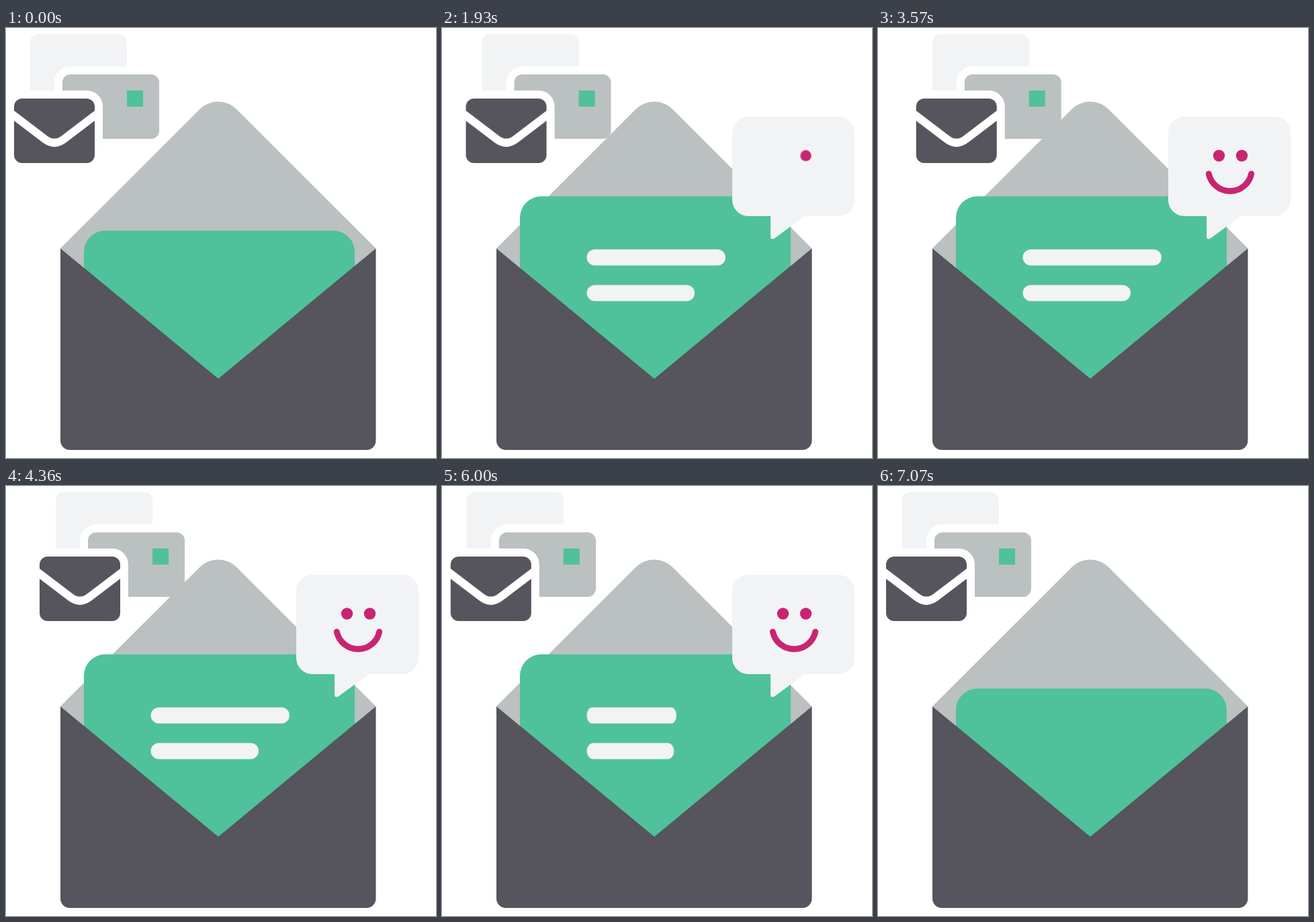
An HTML page without scripts that plays this animation: 640x640 px, repeating every 7.28 s.

```html
<!DOCTYPE html>
<html lang="en">
<head>
<meta charset="utf-8">
<title>Open envelope</title>
<style>
  html, body { margin: 0; width: 100%; height: 100%; overflow: hidden; background: #fff; }
  svg { display: block; width: 100vw; height: 100vh; }

  .dark { fill: #56545c; }
  .grey { fill: #bbc0c0; }
  .pale { fill: #f2f3f5; }
  .green { fill: #4fc19b; }
  .pink { fill: #c92471; }

  .move { animation: 7280ms cubic-bezier(.333, 0, .667, 1) infinite; }
  .mail { animation-name: drift; }
  .sheet { animation-name: rise; }
  .bubble { animation-name: pop; transform-origin: 489px 316px; }
  .line { transform-origin: 215.5px 0; }
  .first { animation-name: write-first; }
  .second { animation-name: write-second; }
  .eye-right { animation-name: open-right; transform-origin: 541.5px 190px; }
  .eye-left { animation-name: open-left; transform-origin: 507.5px 190px; }
  .smile {
    animation-name: smile;
    fill: none; stroke: #c92471; stroke-width: 9; stroke-linecap: round;
    stroke-dasharray: 1 2;
  }

  @keyframes drift {
    0%, 85.03%, 100% { transform: none; }
    51.51% { transform: translateX(45px); }
  }
  @keyframes rise {
    0%, 2.75%, 96.84%, 100% { transform: translateY(51px); }
    17.17%, 88.2% { transform: translateY(0); }
  }
  @keyframes pop {
    0%, 10.78%, 93.4%, 100% { transform: rotate(45deg) scale(0); }
    19.02%, 85.85% { transform: rotate(0deg) scale(1); }
  }
  @keyframes write-first {
    0%, 17.17%, 88.6%, 100% { transform: scaleX(0); }
    24.04%, 78.3% { transform: scaleX(1); }
  }
  @keyframes write-second {
    0%, 19.92%, 86.54%, 100% { transform: scaleX(0); }
    26.1%, 80.84% { transform: scaleX(1); }
  }
  @keyframes open-right {
    0%, 23.35% { transform: scale(0); }
    27.06%, 100% { transform: scale(1); }
  }
  @keyframes open-left {
    0%, 26.92% { transform: scale(0); }
    30.63%, 100% { transform: scale(1); }
  }
  @keyframes smile {
    0%, 32.69% { stroke-dashoffset: 1.1; }
    41.07%, 100% { stroke-dashoffset: 0; }
  }
</style>
</head>
<body>
<svg viewBox="0 0 640 640">
  <path class="grey" d="M81 328L288.2 121A39 39 0 0 1 343.3 121L550.5 328L316 522Z"/>

  <rect class="green move sheet" x="116" y="250.5" width="403" height="290" rx="32"/>
  <g class="pale">
    <rect class="move line first" x="215.5" y="329.5" width="206.5" height="24" rx="12"/>
    <rect class="move line second" x="215.5" y="382.5" width="160.5" height="24" rx="12"/>
  </g>

  <path class="dark" d="M81 328L316 522L550.5 328V614a14 14 0 0 1-14 14H95a14 14 0 0 1-14-14Z"/>

  <g class="move mail">
    <path class="pale" d="M48 9H168a12 12 0 0 1 12 12V57H96a24 24 0 0 0-24 24V93H36V21a12 12 0 0 1 12-12Z"/>
    <path class="grey" d="M96 69H216a12 12 0 0 1 12 12V153a12 12 0 0 1-12 12H144V117a24 24 0 0 0-24-24H84V81a12 12 0 0 1 12-12Z"/>
    <rect class="green" x="180" y="93" width="24" height="24"/>
    <rect class="dark" x="12" y="105" width="120" height="96" rx="12"/>
    <path d="M8 127.5L58 165.5Q72 176 86 165.5L136 127.5" fill="none" stroke="#fff" stroke-width="12"/>
  </g>

  <g class="move bubble">
    <rect class="pale" x="432" y="132" width="182" height="148" rx="24"/>
    <path class="pale" d="M489 279V310.5Q489 316 495 313L540 280V279Z"/>
    <circle class="pink move eye-left" cx="507.5" cy="190" r="8.7"/>
    <circle class="pink move eye-right" cx="541.5" cy="190" r="8.7"/>
    <path class="move smile" pathLength="1" d="M492.3 217A32.4 32.4 0 0 0 555.7 217"/>
  </g>
</svg>
</body>
</html>
```
